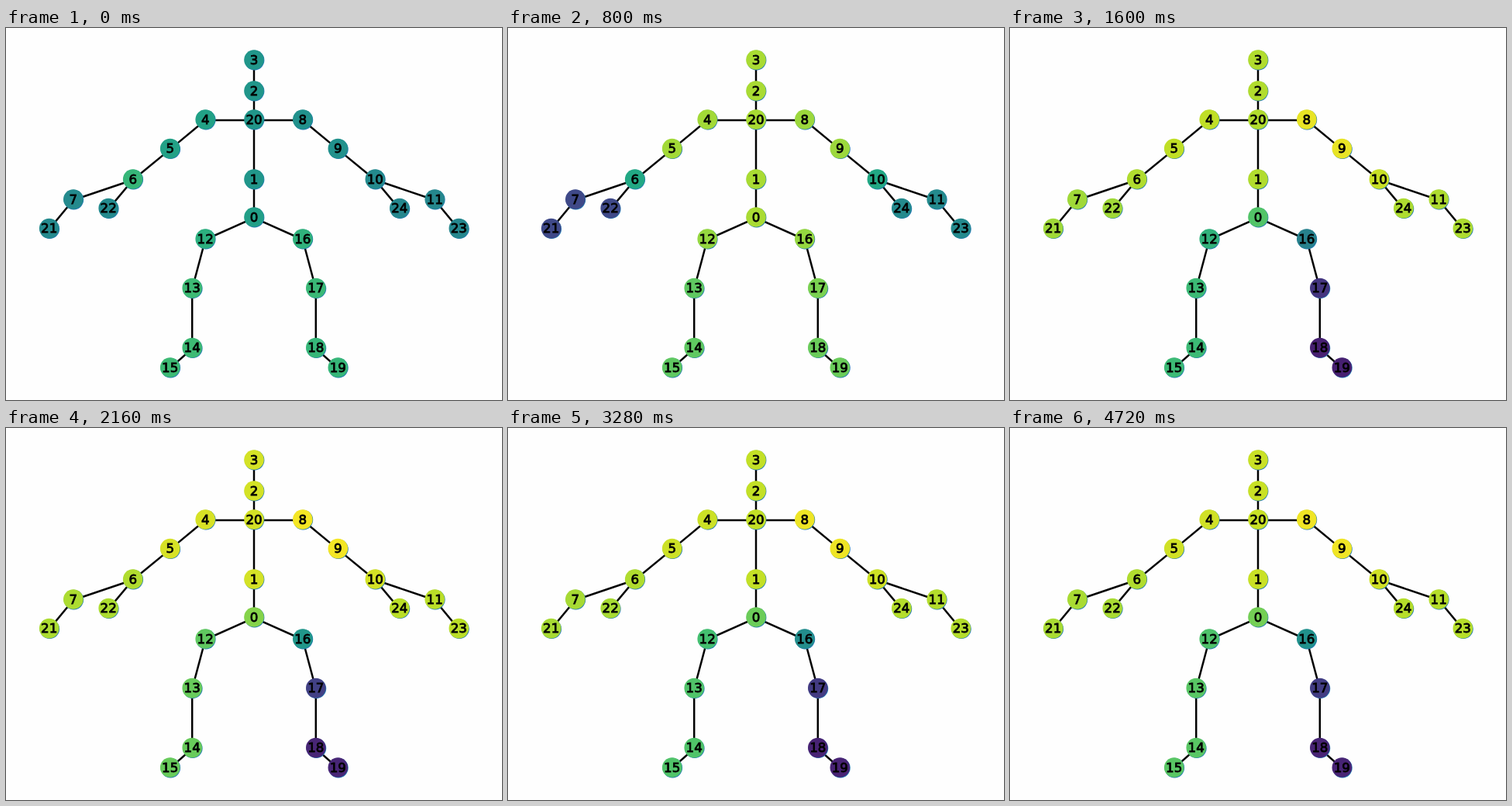
Recreate the animation shown at these times as an HTML page. Size 640 px wide and 480 px high, loop 4.8 s.

```html
<!DOCTYPE html>
<html lang="en">
<head>
<meta charset="utf-8">
<title>Joint activity</title>
<style>
  html, body { margin: 0; width: 100%; height: 100%; overflow: hidden; background: #fefefe; }
  svg { display: block; width: 640px; height: 480px; }
  line { stroke: #000; stroke-width: 2.5; }
  text {
    font: 16.67px "DejaVu Sans", sans-serif;
    text-anchor: middle;
    stroke: #000;
    stroke-width: 0.8px;
  }
</style>
</head>
<body>
<svg id="stage" viewBox="0 0 640 480"></svg>
<script>
const LOOP = 4800, STEP = 80, WAVE = 1680, RADIUS = 12.8, CENTER = 320;
const svg = document.getElementById("stage");

// Joints on the axis, then left joints with the label of their mirror twin.
const spine = { 3: 41, 2: 81, 20: 118, 1: 195, 0: 244 };
const pairs = [
  [4, 8, 257.2, 118], [5, 9, 211.7, 155.6], [6, 10, 163.7, 195],
  [7, 11, 86.8, 221], [22, 24, 132.2, 232.6], [21, 23, 55.7, 258.6],
  [12, 16, 257.2, 272], [13, 17, 240.2, 335.6],
  [14, 18, 240.2, 412.6], [15, 19, 211.7, 438]
];
const chains = [
  "3 2 20 1 0", "20 4 5 6 7 21", "6 22", "20 8 9 10 11 23", "10 24",
  "0 12 13 14 15", "0 16 17 18 19"
];

// Activity in percent per body part: at rest, raised, active, and its swing.
const parts = {
  "3 2 20 1": [52, 87, 92, 3],
  "4 5": [57, 86, 93, 2],
  "6": [66, 60, 88, 0],
  "7 21 22": [47, 22, 87, 1],
  "8 9": [50, 85, 98, 1],
  "10": [47, 60, 93, 1],
  "11 23 24": [46, 47, 89, 1],
  "0": [56, 87, 79, 5],
  "12": [63, 84, 72, 6],
  "13 14 15": [68, 75, 74, 5],
  "16": [64, 84, 50, 5],
  "17": [67, 80, 18, 2],
  "18 19": [66, 77, 10, 1]
};

const palette = ["440154", "482475", "414487", "355f8d", "2a788e", "21918c",
  "22a884", "44bf70", "7ad151", "bddf26", "fde725"]
  .map(hex => hex.match(/../g).map(pair => parseInt(pair, 16)));

const mix = (a, b, k) => a + (b - a) * k;
const clamp = (v, lo, hi) => Math.min(hi, Math.max(lo, v));
const ramp = (t, from, to) => clamp((t - from) / (to - from), 0, 1);

function add(tag, attrs, text) {
  const el = document.createElementNS("http://www.w3.org/2000/svg", tag);
  for (const name in attrs) el.setAttribute(name, attrs[name]);
  if (text !== undefined) el.textContent = text;
  return svg.appendChild(el);
}

function color(level) {
  const pos = clamp(level, 0, 100) / 10;
  const i = Math.min(9, Math.floor(pos));
  const rgb = palette[i].map((c, n) => Math.round(mix(c, palette[i + 1][n], pos - i)));
  return `rgb(${rgb})`;
}

const joints = {};
for (const id in spine) joints[id] = { x: CENTER, y: spine[id] };
for (const [left, right, x, y] of pairs) {
  joints[left] = { x, y };
  joints[right] = { x: 2 * CENTER - x, y };
}

for (const chain of chains) {
  const ids = chain.split(" ");
  for (let i = 1; i < ids.length; i++) {
    const a = joints[ids[i - 1]], b = joints[ids[i]];
    add("line", { x1: a.x, y1: a.y + 1, x2: b.x, y2: b.y + 1 });
  }
}
for (const id in joints) {
  const { x, y } = joints[id];
  add("circle", { cx: x + 0.6, cy: y + 0.6, r: RADIUS, fill: "#1f78b4" });
  joints[id].disc = add("circle", { cx: x, cy: y, r: RADIUS });
}
for (const id in joints) {
  add("text", { x: joints[id].x, y: joints[id].y + 5.6 }, id);
}

function draw(time) {
  const t = Math.floor((time % LOOP) / STEP) * STEP;
  const raise = ramp(t, 0, 800);
  const shift = ramp(t, 800, 1200);
  const drift = 2 * ramp(t, 1200, LOOP) - 1;
  const sway = Math.cos(2 * Math.PI * (t - 2160) / WAVE) + drift;
  for (const ids in parts) {
    const [rest, raised, active, swing] = parts[ids];
    const fill = color(mix(mix(rest, raised, raise), active + swing * sway, shift));
    for (const id of ids.split(" ")) joints[id].disc.setAttribute("fill", fill);
  }
}

function tick() {
  draw(performance.now());
  requestAnimationFrame(tick);
}
tick();
</script>
</body>
</html>
```
